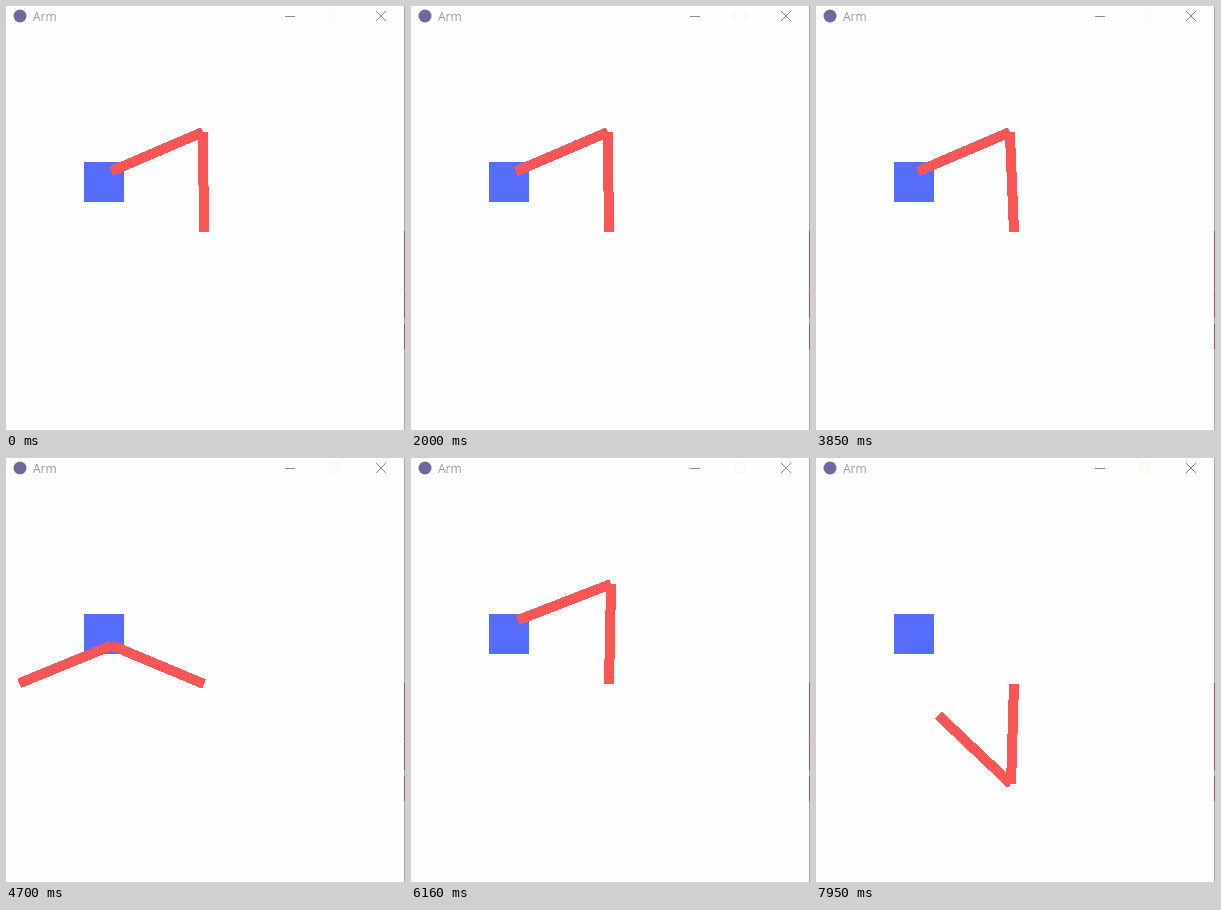
An HTML page for the animation above (8 s loop, 399x424 px).

```html
<!DOCTYPE html>
<html lang="en">
<head>
<meta charset="utf-8">
<title>Arm</title>
<style>
html, body { margin: 0; width: 100%; height: 100%; overflow: hidden; background: #fff; }
svg { display: block; width: 399px; height: 424px; }
text { font: 12px "Open Sans", "Noto Sans", sans-serif; fill: #999; }
</style>
</head>
<body>
<svg viewBox="0 0 399 424">
  <rect width="399" height="424" fill="#fefefe"/>
  <circle cx="14" cy="10" r="6.5" fill="#6b6a9c"/>
  <text x="27" y="15">Arm</text>
  <g fill="none" stroke="#8c8c8c">
    <path d="M279 10.5h10"/>
    <rect x="324.5" y="5.5" width="9" height="9" stroke="#fbf8e6"/>
    <path d="M370 5l10 10M380 5l-10 10"/>
  </g>
  <g stroke="#a6a6a6">
    <path d="M398.5 0V424"/>
    <path d="M398.5 225V283M398.5 284V312M398.5 318V343" stroke="#a04a80"/>
  </g>
  <rect x="78" y="156" width="40" height="40" fill="#566dfb"/>
  <g stroke="#fb5656" stroke-width="10" shape-rendering="crispEdges">
    <line id="upper"/>
    <line id="fore"/>
  </g>
</svg>
<script>
const LOOP = 8000, TICK = 76.7, LEN = 100;
const BASE = [198, 226];
const REST = [90.6, 112.6]; // shoulder angle, elbow angle relative to it
const DECAY = 0.62;

// Each run: start time, then keys of [tick, shoulder, elbow]; afterwards it settles to REST.
const runs = [
  { at: -2000, keys: [[0, ...REST]] },
  { at: 70, keys: [[0, 153, 64], [2, 97, 110]] },
  { at: 1070, keys: [[0, 5, 22], [1, 4, 16], [4, 83, 95], [5, 93, 110]] },
  { at: 2400, keys: [[0, 287, -68.7], [3, 194, 11], [6, 101.6, 112], [10, 114, 90], [14, 110, 93]] },
  { at: 4460, keys: [[0, 220, 15], [3, 157.3, 45], [6, 97, 108]] },
  { at: 5780, keys: [[0, 17, 43], [2, 69, 95], [3, 86, 112]] },
  { at: 6950, keys: [[0, 95, 117], [2, 92.3, 114.5]] },
  { at: 7880, keys: [[0, 296.5, 254], [1, 268.3, 228.3]] }
];

const mix = (a, b, k) => a + (b - a) * k;

function pose(t) {
  const { at, keys } = runs.findLast(r => r.at <= t);
  const n = Math.floor((t - at + 8) / TICK);
  const i = keys.findLastIndex(k => k[0] <= n);
  const [n0, ...from] = keys[i];
  const next = keys[i + 1];
  const to = next ? next.slice(1) : REST;
  const k = next ? (n - n0) / (next[0] - n0) : 1 - DECAY ** (n - n0);
  return from.map((a, j) => mix(a, to[j], k));
}

function reach([x, y], deg) {
  const a = deg * Math.PI / 180;
  return [x + LEN * Math.cos(a), y - LEN * Math.sin(a)];
}

function setLine(id, [x1, y1], [x2, y2]) {
  const el = document.getElementById(id);
  Object.entries({ x1, y1, x2, y2 }).forEach(([k, v]) => el.setAttribute(k, v.toFixed(2)));
}

function draw(t) {
  const [shoulder, elbow] = pose(t);
  const joint = reach(BASE, shoulder);
  setLine("upper", BASE, joint);
  setLine("fore", joint, reach(joint, shoulder + elbow));
}

const t0 = performance.now();
function loop() {
  draw((performance.now() - t0) % LOOP);
  requestAnimationFrame(loop);
}
loop();
</script>
</body>
</html>
```
